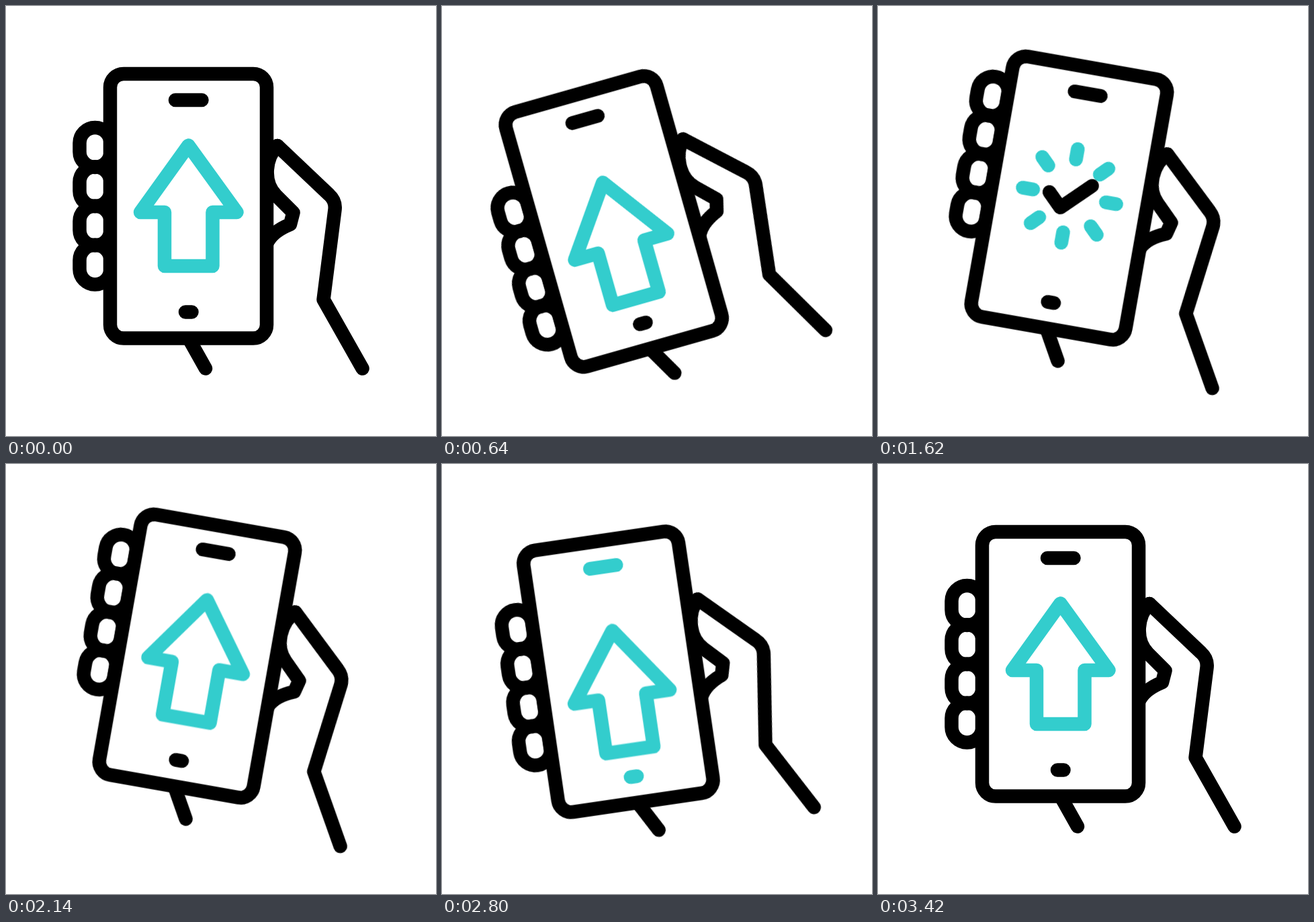
An HTML page that plays this animation: 640x640 px, repeating every 3.6 s.

```html
<!DOCTYPE html>
<html lang="en">
<head>
<meta charset="utf-8">
<title>Phone swipe</title>
<style>
@property --tip { syntax: "<length>"; inherits: true; initial-value: 0px; }
@property --tail { syntax: "<length>"; inherits: true; initial-value: 0px; }

html, body { margin: 0; height: 100%; overflow: hidden; background: #fff; }
svg { display: block; width: 100vw; height: 100vh; }

.line { fill: none; stroke: #000; stroke-width: 20.5; stroke-linecap: round; stroke-linejoin: round; }
.teal { stroke: #33cdcd; }

.tilt, .fingers, .arrow, .keys, .rays, .check {
  animation: 3600ms cubic-bezier(.3333, 0, .6667, 1) infinite;
}
.tilt { transform-origin: 346px 366px; animation-name: tilt; }
.fingers { animation-name: fingers; }
.arrow { animation-name: arrow; }
.keys { animation-name: keys; }
.rays { animation-name: rays, show-rays; }
.check { animation-name: check, show-check; }
.rays, .check { opacity: 0; }

.trim {
  stroke-dasharray: calc(var(--tip) - var(--tail)) 200px;
  stroke-dashoffset: calc(-1 * var(--tail));
}

@keyframes tilt {
  0%, 92.22%, 100% { transform: rotate(0deg); }
  11.67%, 17.22% { transform: rotate(-16deg); }
  30%, 66.67% { transform: rotate(10deg); }
  76.11% { transform: rotate(-10deg); }
  84.44% { transform: rotate(5.5deg); }
}
@keyframes fingers {
  0%, 80%, 100% { transform: translateY(0); }
  11.67%, 17.22% { transform: translateY(34px); }
  30%, 62.22% { transform: translateY(-42px); }
  74.44% { transform: translateY(10px); }
}
@keyframes arrow {
  0%, 62.22%, 95%, 100% { transform: translateY(0); }
  11.67%, 19.44%, 75% { transform: translateY(30px); }
  37.22% { transform: translateY(-300px); animation-timing-function: step-end; }
  55.56% { transform: translateY(300px); animation-timing-function: cubic-bezier(.22, 1, .36, 1); }
}
@keyframes keys {
  0%, 72.22%, 86.11%, 100% { stroke: #000; }
  75%, 83.33% { stroke: #33cdcd; }
}
@keyframes rays {
  0%, 35.56% { --tip: 0px; }
  50.33%, 100% { --tip: 50.5px; }
  0%, 38.67% { --tail: 0px; }
  53.44%, 100% { --tail: 50.5px; }
}
@keyframes check {
  0%, 36.11% { --tip: 0px; }
  43.89%, 100% { --tip: 86px; }
  0%, 47.22% { --tail: 0px; }
  54.44%, 100% { --tail: 86px; }
}
@keyframes show-rays {
  0%, 53.44%, 100% { opacity: 0; animation-timing-function: step-end; }
  35.56% { opacity: 1; animation-timing-function: step-end; }
}
@keyframes show-check {
  0%, 54.44%, 100% { opacity: 0; animation-timing-function: step-end; }
  36.11% { opacity: 1; animation-timing-function: step-end; }
}
</style>
</head>
<body>
<svg viewBox="0 0 640 640">
  <defs>
    <clipPath id="screen"><rect x="156" y="102" width="231" height="391" rx="19"/></clipPath>
    <rect id="finger" x="109.5" y="181" width="46" height="59" rx="23"/>
    <path id="ray" class="trim" d="M271.5 259.5V209"/>
  </defs>
  <g class="tilt line">
    <path d="M404 208C386 226 382 262 402 282L427.5 307.5L423 325C408 331 394 340 388 354"/>
    <path d="M404 208L481 281Q491 290 489.5 303L472.5 437L530.5 539.5"/>
    <path d="M272 495L297 539.5"/>
    <g class="fingers">
      <use href="#finger"/>
      <use href="#finger" y="58.2"/>
      <use href="#finger" y="116.4"/>
      <use href="#finger" y="174.6"/>
    </g>
    <rect x="155" y="101" width="233" height="393.5" rx="20" fill="#fff" stroke="none"/>
    <g clip-path="url(#screen)">
      <path class="arrow teal" d="M271.5 207.5L343.5 307H307.5V387H236V307H200Z"/>
    </g>
    <g class="rays teal">
      <use href="#ray"/>
      <use href="#ray" transform="rotate(45 271.5 294.5)"/>
      <use href="#ray" transform="rotate(90 271.5 294.5)"/>
      <use href="#ray" transform="rotate(135 271.5 294.5)"/>
      <use href="#ray" transform="rotate(180 271.5 294.5)"/>
      <use href="#ray" transform="rotate(225 271.5 294.5)"/>
      <use href="#ray" transform="rotate(270 271.5 294.5)"/>
      <use href="#ray" transform="rotate(315 271.5 294.5)"/>
    </g>
    <path class="check trim" d="M241 294L261 314L302 274"/>
    <rect x="155" y="101" width="233" height="393.5" rx="20"/>
    <path class="keys" d="M252 140H291.5M267 455.5H276.5"/>
  </g>
</svg>
</body>
</html>
```
